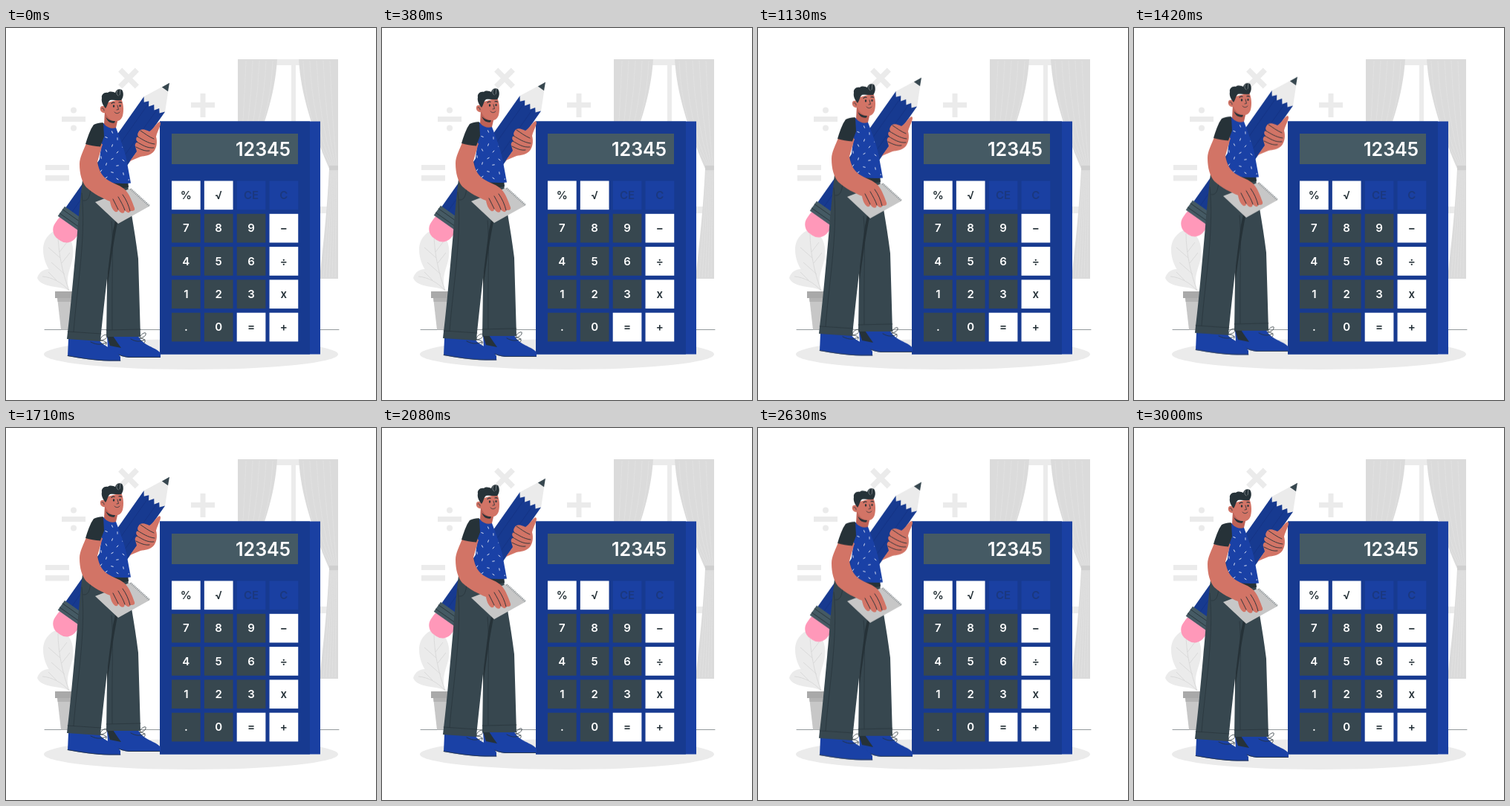
An HTML page that plays this animation: 498x500 px, repeating every 3040 ms.

```html
<!DOCTYPE html>
<html lang="en">
<head>
<meta charset="utf-8">
<title>Calculator</title>
<style>
  html, body { margin: 0; width: 100%; height: 100%; overflow: hidden; background: #fff; }
  svg { display: block; width: 498px; height: 500px; }
  text { font-family: Inter, Roboto, sans-serif; font-weight: 600; text-anchor: middle; }
  .line { fill: none; stroke: #263238; stroke-width: .8; stroke-linecap: round; stroke-linejoin: round; }
  .pale { fill: #ebebeb; }
  .blue { fill: #1a41a6; }
  .navy { fill: #173a90; }
  .dark { fill: #263238; }
  .slate { fill: #37474f; }
  .skin { fill: #d27466; }
  .crease { fill: none; stroke: #263238; stroke-width: .9; stroke-linecap: round; }
  #figure { animation: bob 3.04s ease-in-out infinite; }
  @keyframes bob { 50% { transform: translateY(-8.3px); } }
</style>
</head>
<body>
<svg viewBox="0 0 498 500" xmlns="http://www.w3.org/2000/svg">
  <defs>
    <clipPath id="shirtClip"><path d="M132 131L148 137L160 168L167 205L124 204L128 160Z"/></clipPath>
  </defs>

  <!-- window -->
  <g>
    <path class="pale" d="M320 42H440V50H320Z M384 50H390V130H384Z M420 240H434V249H420Z"/>
    <path fill="#dbdbdb" d="M312 42H365C362 90 347 135 324 186H312Z"/>
    <path fill="#dbdbdb" d="M394 42H447V337H422C426 300 432 250 435 189C412 135 397 90 394 42Z"/>
    <g id="folds" fill="none" stroke="#e4e4e4" stroke-width=".6"></g>
    <path fill="#cfcfcf" d="M435 185H447V191H435Z"/>
  </g>

  <!-- wall symbols -->
  <g class="pale">
    <path d="M249 100H281V107H249Z M261.5 88H268.5V120H261.5Z"/>
    <path d="M-16 -3.7H16V3.7H-16Z M-3.7 -16H3.7V16H-3.7Z" transform="translate(165 67.5) rotate(45)"/>
    <path d="M75 119H107V126H75Z M53 184H85V191H53Z M53 198H85V205.500H53Z"/>
    <circle cx="91" cy="110.500" r="4"/><circle cx="91" cy="134.500" r="4"/>
  </g>

  <!-- floor -->
  <path class="line" style="stroke-width:.5" d="M52 405.500H448"/>
  <ellipse class="pale" cx="249" cy="438.500" rx="198" ry="20.500"/>

  <!-- plant -->
  <g>
    <path class="pale" d="M85 353C66 339 50 320 50 298C50 282 61 273 72 270C86 277 92 290 90 307C88 323 79 333 85 353Z"/>
    <path class="pale" d="M85 353C73 346 48 350 42 336C46 323 60 321 70 328C78 333 80 343 85 353Z"/>
    <path class="pale" d="M93 305C92 295 96 288 106 284V305Z"/>
    <path fill="none" stroke="#d6d6d6" stroke-width=".8" d="M85 353C76 330 70 300 70 276M79 331L61 315M73 309L57 295M75 316L86 302M72 301L82 288M85 353C75 342 62 335 49 334M68 339L57 328"/>
    <path fill="#c7c7c7" d="M69 362H108L103 405.500H74Z"/>
    <path fill="#a9a9a9" d="M66 354H111V363H66Z"/>
    <path fill="#b3b3b3" d="M69 363H108L107.500 368H69.600Z"/>
  </g>

  <!-- calculator -->
  <g>
    <path fill="#1a40a2" d="M207 125.500H423V438.500H207Z"/>
    <path class="navy" d="M207 125.500H409V438.500H207Z"/>
    <path fill="#455a64" d="M223 142H393V183H223Z"/>
    <text x="346" y="171.500" font-size="25" fill="#fff">12345</text>
    <g id="keys" font-size="15"></g>
  </g>

  <g id="figure">
    <!-- pencil -->
    <g transform="translate(220 73.700) rotate(35.2)">
      <rect x="-17" y="222" width="34" height="36" rx="15" fill="#ff98b9"/>
      <path class="navy" d="M-17.500 35H17.500V222H-17.500Z"/>
      <path fill="none" stroke="#143180" stroke-width=".6" d="M-7 40V220M7 40V220"/>
      <path class="pale" d="M-4.500 9H4.500L17.500 35L12.500 41L8.500 36L4.500 42L0 36L-4.500 42L-8.500 36L-13 41L-17.500 35Z"/>
      <path class="slate" d="M0 0L5 10.500H-5Z"/>
      <path fill="#455a64" d="M-19.500 217H19.500V233H-19.500Z"/>
      <path class="line" d="M-19.500 222H19.500M-19.500 228.500H19.500"/>
    </g>

    <!-- shoes -->
    <g>
      <path class="blue" d="M136 414H178C184 427 202 429 208 437V443H165C153 442 143 435 137 430Z"/>
      <path class="dark" d="M136 414H144L150 423L155 430L140 427Z"/>
      <path class="line" d="M138 431C148 438 155 441.500 166 442.500H207M168 418C177 423 181 421 187 419M180 417C180 411 190 407 188 412C187 416 180 417 180 417C184 417 190 419 186 423"/>
      <path class="blue" d="M84 418H124C131 429 149 432 154 442V447.500H139C120 447 100 444 83 441Z"/>
      <path class="line" d="M83 440.500C100 443.500 121 447 139 447H154M114 422C124 427 128 425 135 423M127 420C126 414 137 409 136 415C135 419 127 420 127 420C131 420 138 422 134 426"/>
    </g>

    <!-- trousers -->
    <g>
      <path class="slate" d="M124 206H164C165 235 173 268 178 310L181 415H135L137 280Z"/>
      <path class="dark" d="M140 250L151 257C145 285 141 315 136 352L137 290Z"/>
      <path class="slate" d="M103 204L148 207C152 230 149 253 144 273C139 310 132 370 127 421L82 418C87 378 93 310 96 275C98 250 101 222 103 204Z"/>
      <path class="dark" d="M125 204L164 207L165 214C150 217 138 214 125 211Z"/>
      <path class="line" opacity=".75" d="M83 408L128 411M135 406L181 405M102 222C108 280 96 345 91 408M142 260C145 290 142 350 143 405M104 232C110 233 113 228 114 215"/>
    </g>

    <!-- shirt -->
    <path class="blue" d="M131 128L148 134C154 150 159 162 162 176L168 208.500C154 210 138 208 122 206L128 160Z"/>
    <g id="dashes" clip-path="url(#shirtClip)" stroke="#fff" stroke-width=".8" stroke-linecap="round"></g>

    <!-- notepad -->
    <path fill="#c7c7c7" d="M120 234L168 215.500L194 239L151 263Z"/>
    <path fill="none" stroke="#8d9599" stroke-width="3" stroke-dasharray=".8 1.500" d="M168 216.500L193 239"/>

    <!-- near arm -->
    <path class="skin" d="M109 153C104 165 99 174 99 183C99 196 102 207 108 214C118 223 130 229 140 233C141 239 143 244 147 247C150 248 151 246 151 244C153 248 157 250 159 248L160 245C163 249 167 249 167 246C171 246 174 246 173 242C170 234 167 225 161 218C155 212 147 210 140 206C130 201 125 192 123 180L130 156Z"/>
    <path class="crease" d="M144 230C147 236 149 240 151 244M151 227C155 234 158 239 160 245M157 224C162 231 165 238 167 246"/>
    <path class="dark" d="M118 130C123 128 127 127 131 127.500L132 146L127 159.500C120 159 113 158 107 156C110 146 113 137 118 130Z"/>

    <!-- head -->
    <path fill="#bd6156" d="M133 112L151 121L148 134C143 136 136 134 132 129Z"/>
    <path class="dark" d="M134.500 120C138 124 143 125.500 147 125L146 127.500C140 128.500 136 125 134.500 120Z"/>
    <path class="skin" d="M134 101L155 95C158 101 159 110 157 118C155 124 151 126 146 125C140 124 136 120 134 114C129 115 126 111 127 107C128 104 132 104 134 107Z"/>
    <path class="dark" d="M134 108C130 103 128 99 129 94C128 90 132 86 137 87C140 84 145 86 147 87C148 83 152 81 156 83C159 87 158 94 155 97C150 98 145 96 140 97C137 99 137 104 134 108Z"/>
    <path class="line" style="stroke:#a9afb2;stroke-width:.6" d="M150 84C148 87 149 90 151 91M154 83C153 86 154 88 153 90"/>
    <ellipse class="dark" cx="145" cy="105" rx="1.200" ry="1.700"/>
    <ellipse class="dark" cx="153.500" cy="104.500" rx="1.100" ry="1.600"/>
    <path class="line" style="stroke-width:1.200" d="M142 101.500C143 100 144.500 99.800 146 100.500M152 100C153.200 99.200 154.200 99.400 155.200 100.300"/>
    <path class="line" d="M150 104L151.500 109.500L149 110M146 113C148 115.500 151 115.200 153 113M129 108C131 107 132 109 132 111"/>

    <!-- far hand -->
    <path class="skin" d="M181 137C184 135 189 137 193 139C198 136 201 130 205 127C207 125 209 127 207.500 131C206 136 203 141 202 146C204 153 203 162 198 167C194 171 187 172 181 173L169 178L166 180L176 166L174 159C173 156 175 154 177 153C174 150 175 146 178 146C176 143 178 139 181 137Z"/>
    <path class="crease" d="M181 138C187 142 192 146 199 149M177 146C184 150 191 155 200 156M176 153C183 157 190 162 199 161M175 160C181 163 187 166 193 165"/>
  </g>
</svg>

<script>
  const byId = id => document.getElementById(id);

  // calculator keys
  const rows = ["% √ CE C", "7 8 9 −", "4 5 6 ÷", "1 2 3 x", ". 0 = +"];
  byId("keys").innerHTML = rows.map((row, r) => row.split(" ").map((label, c) => {
    const x = 223 + c * 43.85, y = 205.5 + r * 44.3;
    const muted = r === 0 && c > 1;
    const light = (r === 0 && c < 2) || (r > 0 && c === 3) || label === "=";
    const fill = muted ? "#1a40a2" : light ? "#fff" : "#37474f";
    const ink = muted ? "#1b387f" : light ? "#263238" : "#fff";
    return `<rect x="${x}" y="${y}" width="38.7" height="38.7" fill="${fill}"/>` +
      `<text x="${x + 19.3}" y="${y + 24.6}" fill="${ink}">${label}</text>`;
  }).join("")).join("");

  // curtain folds, mirrored about the middle of the window
  let folds = "";
  for (let i = 0; i < 5; i++) {
    const top = 400 + i * 9, tie = 437 + i * 2;
    folds += `<path d="M${top} 44Q${top + 3} 125 ${tie} 184"/>`;
    folds += `<path d="M${759 - top} 44Q${756 - top} 125 ${759 - tie} 184"/>`;
    folds += `<path d="M${tie} 192Q${433 + i * 2.6} 270 ${427 + i * 4} 335"/>`;
  }
  byId("folds").innerHTML = folds;

  // shirt pattern
  let dashes = "";
  for (let i = 0; i < 24; i++) {
    const row = Math.floor(i / 3);
    const x = 128 + (i % 3) * 15 + (row % 2) * 7;
    const y = 138 + row * 9 + (i % 3) * 2;
    dashes += `<path d="M-1.3 0H1.3" transform="translate(${x} ${y}) rotate(${i * 67})"/>`;
  }
  byId("dashes").innerHTML = dashes;
</script>
</body>
</html>
```
